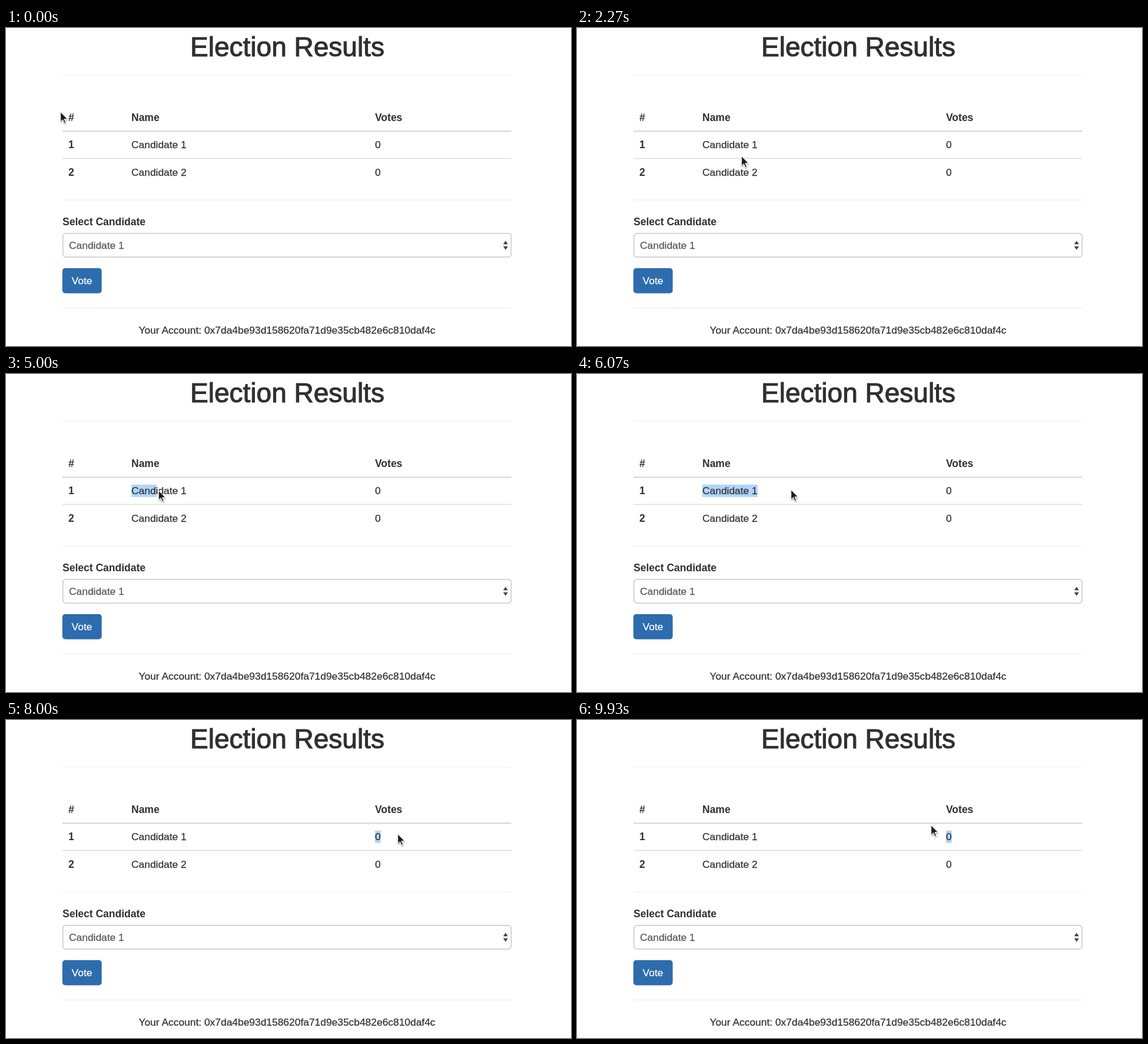
Animation of 960x540 px, one loop 10 s. Source, as an HTML page:

```html
<!DOCTYPE html>
<html lang="en">
<head>
<meta charset="utf-8">
<title>Election Results</title>
<style>
  html, body { margin: 0; width: 100%; height: 100%; overflow: hidden; background: #fff; }
  svg { display: block; width: 960px; height: 540px; }
  text { font: 17.4px "Liberation Sans", Arial, sans-serif; fill: #303030; stroke: #303030; stroke-width: .25; }
  .bold { font-size: 17.5px; font-weight: bold; stroke: none; }
  .title { font-size: 46px; stroke-width: 1.1; }
  .mid { text-anchor: middle; }
  .rule { stroke: #eee; stroke-width: 1.2; }
  .row { stroke: #dcdcdc; stroke-width: 1.3; }
  #marks { fill: #b1d4fb; }
</style>
</head>
<body>
<svg viewBox="0 0 960 540">
  <defs>
    <filter id="shadow" x="-50%" y="-50%" width="200%" height="200%">
      <feDropShadow dx="0.5" dy="1.5" stdDeviation="1.3" flood-opacity=".45"/>
    </filter>
  </defs>
  <path class="rule" d="M96 80H858.5M96 292H858.5M96 475.3H858.5"/>
  <path class="row" d="M96 221.5H858.5"/>
  <path class="row" d="M96 175.3H858.5" style="stroke-width:2.5"/>
  <g id="marks"></g>

  <text class="title mid" x="478" y="48">Election Results</text>
  <g id="table"></g>

  <text class="bold" x="96" y="335.3">Select Candidate</text>
  <rect x="96.7" y="348.7" width="761.6" height="40.2" rx="5" fill="#fff" stroke="#c8c8c8" stroke-width="1.5"/>
  <text x="107" y="375" style="fill:#555;stroke:#555">Candidate 1</text>
  <path d="M844.8 367.3l4-6 4 6zM844.8 370.7l4 6 4-6z" fill="#444"/>

  <rect x="95.8" y="407.8" width="66.8" height="42.6" rx="5" fill="#2d6cad"/>
  <text class="mid" x="129" y="435.3" style="fill:#fff;stroke:#fff">Vote</text>
  <text class="mid" x="477.5" y="519">Your Account: 0x7da4be93d158620fa71d9e35cb482e6c810daf4c</text>

  <path id="cursor" d="M.7 .7V17L4.5 13.6 7.1 19.7 9.6 18.6 7 12.7H12.4Z"
        fill="#1c1c1c" stroke="#fff" stroke-linejoin="round" filter="url(#shadow)"/>
</svg>
<script>
const LOOP = 10000, FPS = 15;
const columns = [106, 213, 627], labels = ['#', 'Name', 'Votes', '1', 'Candidate 1', '0', '2', 'Candidate 2', '0'];

const clamp = (v, lo, hi) => Math.min(hi, Math.max(lo, v));
const smooth = u => u * u * (3 - 2 * u);
const flick = u => 1 - (1 - u) ** 5;

function add(parent, tag, attrs, text = '') {
  const el = document.createElementNS('http://www.w3.org/2000/svg', tag);
  for (const key in attrs) el.setAttribute(key, attrs[key]);
  el.textContent = text;
  return document.getElementById(parent).appendChild(el);
}

const cells = labels.map((text, i) => {
  const row = Math.floor(i / 3), x = columns[i % 3], y = 158 + 46.3 * row, top = y - 16.5;
  const label = add('table', 'text', { x, y, class: row && i % 3 ? '' : 'bold' }, text);
  return {
    x, top, size: text.length, step: label.getComputedTextLength() / text.length,
    mark: add('marks', 'rect', { x, y: top, height: 21 })
  };
});

// Pointer moves: start, end, x, y, easing
const moves = [
  [0, 133, 70, 141], [235, 1130, 833, 236, flick], [1400, 2470, 221, 215], [2470, 3400, 100, 195],
  [3560, 4330, 211, 198], [4530, 5470, 306, 196], [5470, 5930, 363, 196], [6070, 6530, 494, 195],
  [6600, 7400, 622, 193], [7600, 8000, 665, 193], [8600, 9670, 601, 178]
];
// Text drags: press, release, cleared, first cell
const drags = [[235, 1130, 1460, 0], [3560, 4330, 4500, 3], [4530, 5930, 7600, 4], [7600, 8000, LOOP, 5]];

function pointer(t) {
  let x = 92, y = 142;
  for (const [start, end, toX, toY, ease = smooth] of moves) {
    const k = ease(clamp((t - start) / (end - start), 0, 1));
    x += (toX - x) * k;
    y += (toY - y) * k;
  }
  return [x, y];
}

// Number of selected characters in each cell, in reading order up to the pointer
function selection(t) {
  const drag = drags.find(([press, , cleared]) => t >= press && t < cleared);
  if (!drag) return cells.map(() => 0);
  const [x, y] = pointer(Math.min(t, drag[1]));
  const row = clamp(Math.round((y - 152) / 46.3), 0, 2);
  const last = row * 3 + Math.max(0, columns.filter(c => c <= x).length - 1);
  return cells.map((cell, i) => {
    if (i < drag[3] || i > last) return 0;
    if (i < last) return cell.size;
    return y < cell.top ? 0 : clamp(Math.round((x - cell.x) / cell.step), 0, cell.size);
  });
}

function draw(now) {
  const t = Math.floor((now % LOOP + 4) * FPS / 1000) * 1000 / FPS % LOOP;
  document.getElementById('cursor').setAttribute('transform', `translate(${pointer(t)})`);
  const chars = selection(t);
  cells.forEach(({ mark, step }, i) =>
    mark.setAttribute('width', chars[i] * step + (chars[i] && chars[i + 1] ? 4.5 : 0)));
  requestAnimationFrame(draw);
}
requestAnimationFrame(draw);
</script>
</body>
</html>
```
